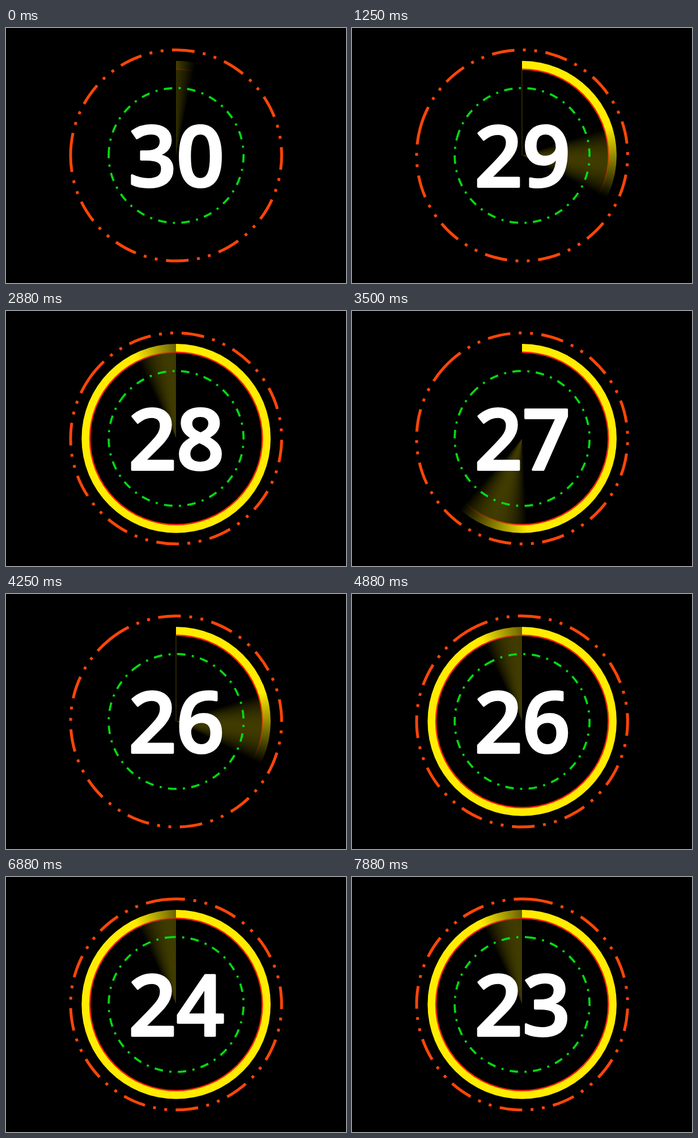
Animation, 600 px wide and 450 px high, one loop 8000 ms. Source, as an HTML page with a canvas:

```html
<!DOCTYPE html>
<html lang="en">
<head>
<meta charset="utf-8">
<title>Countdown</title>
<style>
html, body { margin: 0; width: 100%; height: 100%; overflow: hidden; background: #000; }
canvas { display: block; }
</style>
</head>
<body>
<canvas id="stage" width="600" height="450"></canvas>
<script>
const ctx = document.getElementById('stage').getContext('2d');
const CX = 300.2, CY = 224.9, TAU = Math.PI * 2;
const LOOP = 8000, STEP = 125;
const FEATHER = 45, LEAD = 12, SWEEP = 419, SPIN = 12; // degrees, degrees per second
const clamp = v => Math.max(0, Math.min(1, v));

// Clockwise wipe from the top with a soft leading edge
function wipe(rgb, lead) {
  const g = ctx.createConicGradient(-TAU / 4, CX, CY);
  const stop = deg => {
    const alpha = clamp((lead - deg) / FEATHER);
    g.addColorStop(deg / 360, `rgba(${rgb},${alpha})`);
  };
  [0, lead - FEATHER, lead, 360]
    .filter((d, i) => i % 3 === 0 || (d > 0 && d < 360))
    .forEach(stop);
  return g;
}

function circle(r) {
  ctx.beginPath();
  ctx.arc(CX, CY, r, 0, TAU);
}

function disc(r, fill) {
  circle(r);
  ctx.fillStyle = fill;
  ctx.fill();
}

// Dash lengths are multiples of the line width, starting at the left
function dashedRing(r, width, units, color, deg) {
  const start = Math.PI + deg * TAU / 360;
  ctx.beginPath();
  ctx.arc(CX, CY, r, start, start + TAU - 1e-4);
  ctx.setLineDash(units.map(u => u * width));
  ctx.lineWidth = width;
  ctx.strokeStyle = color;
  ctx.stroke();
  ctx.setLineDash([]);
}

function drawSweep(p) {
  const lead = LEAD + SWEEP * p;
  disc(166.8, wipe('255,236,0', lead));
  disc(152.2, wipe('0,0,0', lead));
  circle(152.2);
  ctx.lineWidth = 2.5;
  ctx.strokeStyle = wipe('250,36,8', lead);
  ctx.stroke();
  if (p > 0 && p < 0.5) {
    ctx.fillStyle = 'rgba(255,225,0,0.32)';
    ctx.fillRect(299.5, 73, 1, CY - 73);
  }
}

function drawNumber(n) {
  ctx.font = '600 148px "Open Sans", "Noto Sans", sans-serif';
  ctx.textAlign = 'center';
  ctx.textBaseline = 'alphabetic';
  ctx.fillStyle = ctx.strokeStyle = '#fff';
  ctx.lineWidth = 4;
  ctx.lineJoin = 'round';
  ctx.fillText(n, 300.8, 280);
  ctx.strokeText(n, 300.8, 280);
}

function draw(ms) {
  const t = Math.floor((ms % LOOP) / STEP) * STEP / 1000;
  ctx.fillStyle = '#000';
  ctx.fillRect(0, 0, 600, 450);
  drawSweep(t % 1);
  dashedRing(186.2, 5, [8, 3, 1, 3, 1, 3], '#ff4608', t * SPIN);
  dashedRing(119, 3.75, [4, 3, 1, 3], '#06d812', t * SPIN);
  drawNumber(String(30 - Math.floor(t)));
}

let begin;
function tick(now) {
  begin ??= now;
  draw(now - begin);
  requestAnimationFrame(tick);
}
draw(0);
requestAnimationFrame(tick);
</script>
</body>
</html>
```
